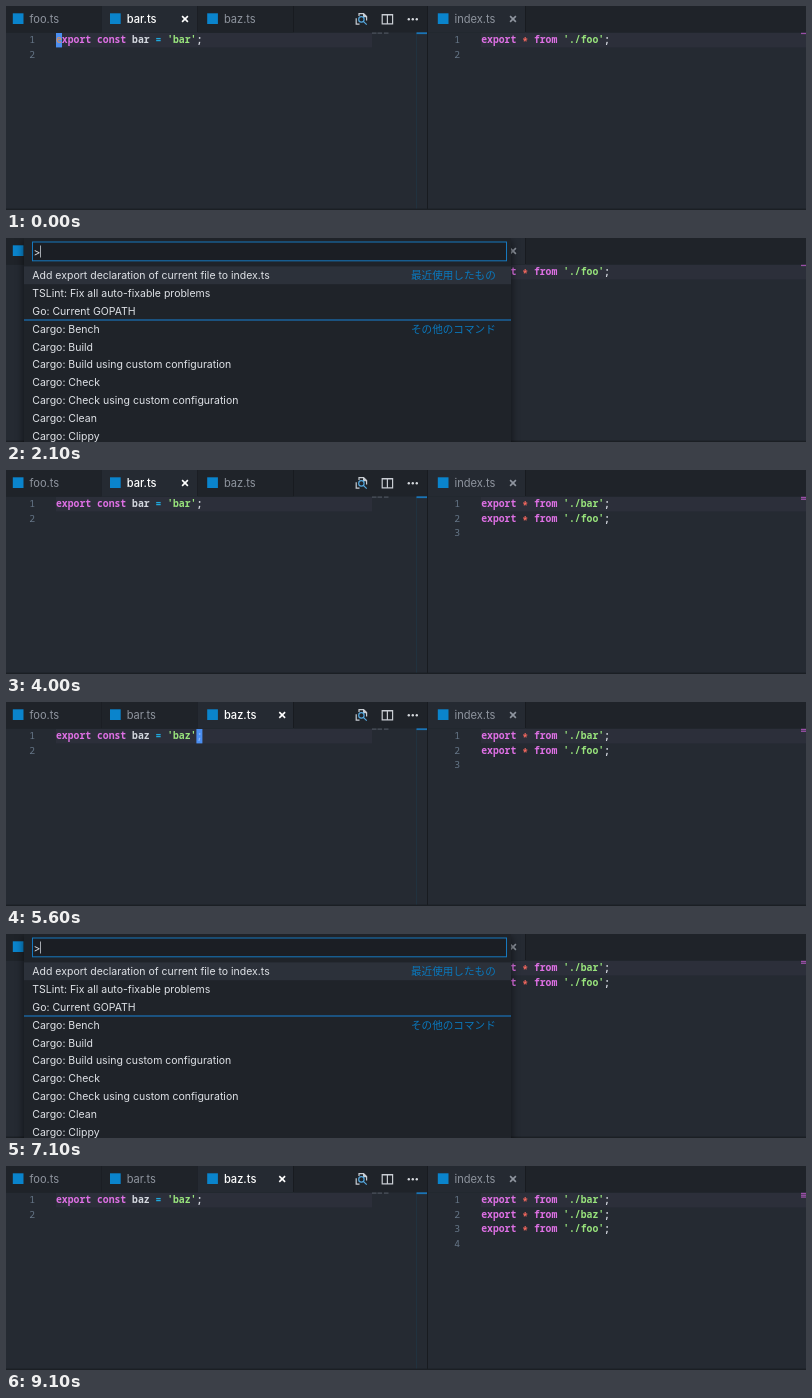
Recreate the animation shown at these times as an HTML page. Size 800 by 204 pixels, loop 9200 ms.

```html
<!DOCTYPE html>
<html lang="en">
<head>
<meta charset="utf-8">
<title>Export command in an editor</title>
<style>
  html, body { margin: 0; width: 100%; height: 100%; overflow: hidden; background: #252a32; }
  svg { display: block; width: 800px; height: 204px; }
  text { white-space: pre; }
  .code { font: 600 9.75px "Noto Sans Mono", "DejaVu Sans Mono", monospace; fill: #d3d7de; }
  .num { fill: #667688; font-weight: 400; }
  .key { fill: #de70e4; }
  .op { fill: #1fa8dc; }
  .star { fill: #f9695f; }
  .str { fill: #98e37c; }
  .tab { font: 11.1px Inter, "Open Sans", sans-serif; fill: #8f959f; }
  .tab.on { fill: #fff; font-weight: 500; }
  .item { font: 10.5px Inter, "Open Sans", sans-serif; fill: #dfe2e7; }
  .hint { font: 10.6px "Noto Sans CJK JP", "Noto Sans CJK", sans-serif; fill: #0a78bd; }
  .line { fill: none; stroke: #c9cdd3; stroke-width: 1.2; }
  #palette { filter: drop-shadow(0 3px 4px #0009); }
</style>
</head>
<body>
<svg id="stage" viewBox="0 0 800 204"></svg>
<script>
const LOOP = 9200;
const PITCH = 14.5;
const BG = '#252a32', BAR = '#1f2329', EDGE = '#181b20', ROW = '#2c2f3a';

// Times in ms
const SWITCH = 4400, ADD_BAR = 3200, ADD_BAZ = 8000;

const rect = (x, y, w, h, fill, more = '') =>
  `<rect x="${x}" y="${y}" width="${w}" height="${h}" fill="${fill}" ${more}/>`;
const text = (x, y, cls, body) => `<text x="${x}" y="${y}" class="${cls}">${body}</text>`;
const span = (cls, s, dy = 0) => `<tspan class="${cls}" dy="${dy}">${s}</tspan>`;
const during = (spans, body, more = '') =>
  `<g data-show="${spans.map(s => s.join('-')).join(' ')}" ${more}>${body}</g>`;
const baseline = row => 37.4 + row * PITCH;

const cross = (x, color) =>
  `<path d="M${x - 2.9} 10.1l5.8 5.8m0-5.8l-5.8 5.8" stroke="${color}" stroke-width="1.6"/>`;

function tab(x, width, icon, name, active, shade = active ? BG : BAR) {
  return rect(x, 0, width, 26.5, shade) +
    rect(x + width - 1, 0, 1, 26, EDGE) +
    rect(icon, 7.3, 10.7, 10.7, '#0a84cc') +
    text(icon + 16.7, 17, active ? 'tab on' : 'tab', name) +
    (active ? cross(icon + 75, '#fff') : '');
}

const numbers = (x, count) => Array.from({ length: count }, (_, i) =>
  text(x, baseline(i), 'code num', i + 1)).join('');

function leftPane(name) {
  const tabs = ['foo', 'bar', 'baz'].map((file, i) =>
    tab(i * 96 - .5, 96.5, 6.8 + i * 97.2, file + '.ts', file === name));
  return tabs.join('') + text(50, baseline(0), 'code',
    `${span('key', 'export const')} ${name} ${span('op', '=')} ${span('str', `'${name}'`)};`);
}

function indexFile(names) {
  const lines = names.map((n, i) => text(475.2, baseline(i), 'code',
    `${span('key', 'export')} ${span('star', '*', 1.6)} ${span('key', 'from', -1.6)} ${span('str', `'./${n}'`)};`) +
    rect(795, 26.8 + i * 1.8, 5, 1.3, '#9a4fa6'));
  return lines.join('') + numbers(448.3, names.length + 1);
}

function toolIcons() {
  return `<g class="line">
    <path d="M353.5 18.2h-3.3v-6M353 10V7.6h4.6l3 3v4M357.6 7.6v3h3"/>
    <circle cx="355.4" cy="13.4" r="2.7" stroke="#55a9e0"/><path d="M357.3 15.3l3.4 3.4" stroke="#55a9e0"/>
    <path d="M376.2 8.6h10.4v9.2h-10.4zM381.4 8.6v9.2M376 9h10.8"/></g>` +
    [402.8, 406.8, 410.8].map(x => `<circle cx="${x}" cy="13.2" r="1.2" fill="#d5d8dd"/>`).join('');
}

function palette() {
  const items = ['Add export declaration of current file to index.ts',
    'TSLint: Fix all auto-fixable problems', 'Go: Current GOPATH',
    ...['Bench', 'Build', 'Build using custom configuration', 'Check',
      'Check using custom configuration', 'Clean', 'Clippy'].map(s => 'Cargo: ' + s)];
  const y = i => 41.1 + i * 17.85;
  return rect(18, 0, 487, 210, '#1f2329') +
    rect(26.5, 4, 474, 18.8, '#1b1e24', 'stroke="#1678be"') +
    text(27.5, 17.5, 'item', '&gt;') + rect(34, 7.5, .8, 12, '#c8ccd2') +
    rect(18, 28.4, 487, 17.8, '#2c313a') +
    rect(18, 81.4, 487, 1.2, '#1a71b8') +
    items.map((s, i) => text(26.3, y(i), 'item', s)).join('') +
    text(405, y(0), 'hint', '最近使用したもの') + text(405, y(3), 'hint', 'その他のコマンド');
}

function cursor(x, char, color) {
  return rect(x, 27, 6, 14.4, '#4b8ef0') +
    `<text x="${x}" y="${baseline(0)}" class="code" style="fill:${color}">${char}</text>`;
}

const stage = document.getElementById('stage');
stage.innerHTML =
  rect(0, 0, 800, 204, BG) + rect(0, 0, 800, 26.5, BAR) +
  // left pane
  rect(50, 27, 316, 14.4, ROW) +
  during([[0, SWITCH]], leftPane('bar')) +
  during([[SWITCH, LOOP]], leftPane('baz')) +
  numbers(23.3, 2) + toolIcons() +
  [366, 371.5, 378].map(x => rect(x, 26.6, 4.5, 1, '#555c67')).join('') +
  rect(410, 27, 1, 176, '#21323f') +
  rect(410.5, 26.3, 10.5, 1.8, '#1a74b6') +
  during([[0, 500], [1000, 1500], [2000, 2100], [2800, 3700], [4200, SWITCH]], cursor(50, 'e', '#c48f72')) +
  during([[SWITCH, 4900], [5400, 5900], [6400, 6800], [7500, 8000], [8500, 9000]], cursor(190.4, ';', '#86b6f8')) +
  // right pane
  rect(421, 0, 1, 204, EDGE) +
  tab(422, 98, 431.8, 'index.ts', false, BG) + cross(507, '#8f959f') +
  rect(475, 27, 325, 14.4, ROW) +
  during([[0, ADD_BAR]], indexFile(['foo'])) +
  during([[ADD_BAR, ADD_BAZ]], indexFile(['bar', 'foo'])) +
  during([[ADD_BAZ, LOOP]], indexFile(['bar', 'baz', 'foo'])) +
  rect(0, 202.6, 800, 1.4, '#1b1f24') +
  during([[2100, 2800], [6800, 7500]], palette(), 'id="palette"');

const parts = [...stage.querySelectorAll('[data-show]')].map(el => ({
  el, spans: el.dataset.show.split(' ').map(s => s.split('-').map(Number))
}));

const start = performance.now();
function draw() {
  const t = (performance.now() - start) % LOOP;
  for (const { el, spans } of parts)
    el.style.display = spans.some(([a, b]) => t >= a && t < b) ? '' : 'none';
  requestAnimationFrame(draw);
}
draw();
</script>
</body>
</html>
```
